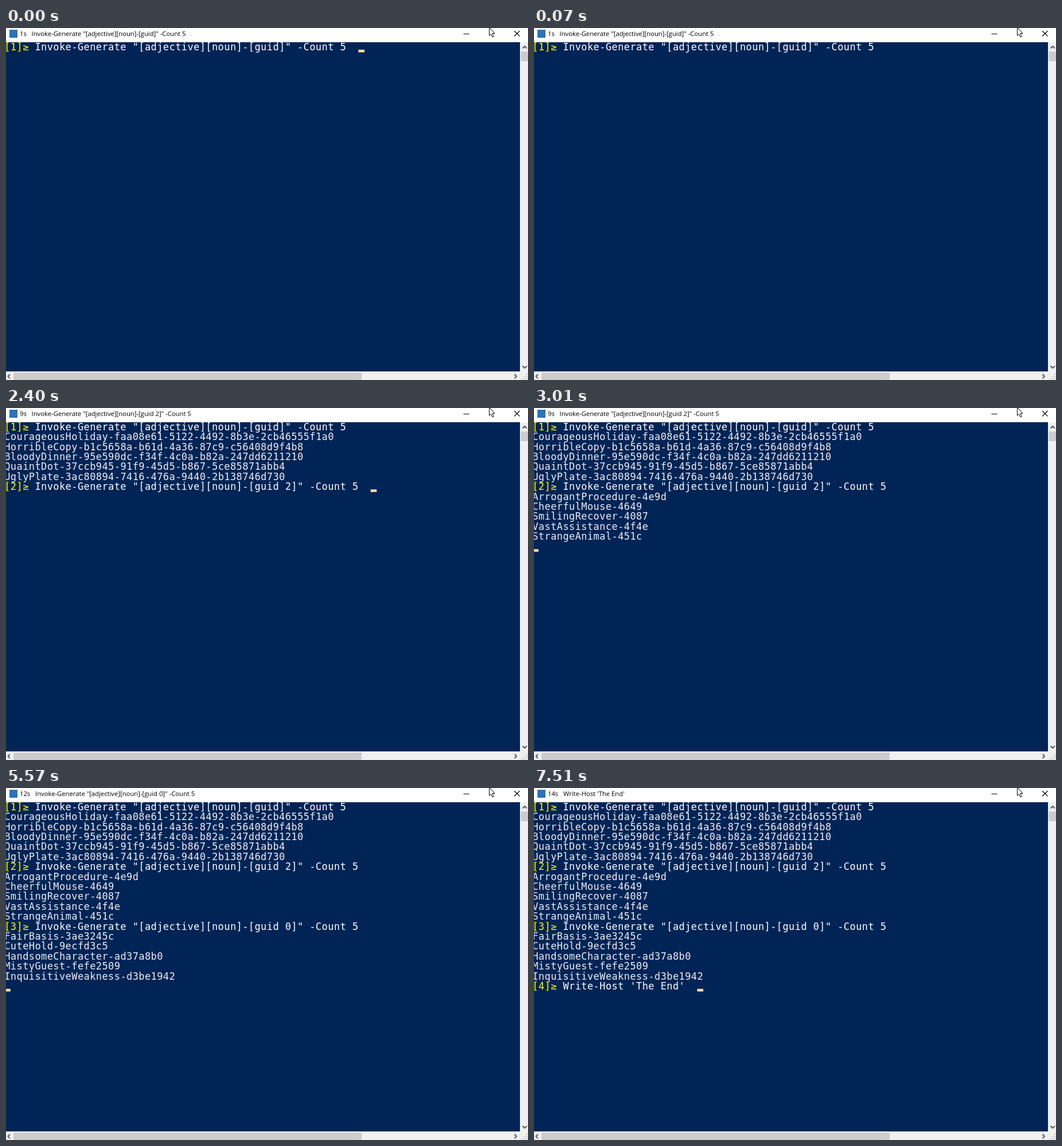
Recreate the animation shown at these times as an HTML page. Size 910x615 px, loop 8.06 s.

```html
<!DOCTYPE html>
<html lang="en">
<head>
<meta charset="utf-8">
<title>Console session</title>
<style>
  html, body { margin: 0; width: 100%; height: 100%; overflow: hidden; background: #fff; }
  svg { display: block; }
  text { white-space: pre; }
  #title { font: 11.25px "Open Sans", sans-serif; }
  #rows { font: 17px "DejaVu Sans Mono", monospace; letter-spacing: .406px; fill: #eeedf0; }
  #rows .prompt { fill: #ff0; }
  #rows .command { fill: #fff; }
  .thumb { fill: #cdcdcd; }
  .arrow { fill: none; stroke: #505050; stroke-width: 1.8; }
</style>
</head>
<body>
<svg width="910" height="615" viewBox="0 0 910 615">
  <rect width="910" height="615" fill="#fff"/>
  <rect x="6" y="3" width="14" height="14" fill="#2b72b9"/>
  <text id="title" x="24" y="14"></text>
  <path d="M797.5 10.5h10M886 5l9.5 9.5M895.5 5l-9.5 9.5" fill="none" stroke="#000" stroke-width="1.1"/>

  <rect y="24.8" width="896" height="575.2" fill="#012456"/>
  <g id="rows"></g>
  <rect id="caret" width="10.64" height="4.6" fill="#fedba9"/>

  <rect x="896" y="25" width="14" height="575" fill="#f0f0f0"/>
  <rect y="600" width="910" height="15" fill="#f0f0f0"/>
  <rect class="thumb" x="897.5" y="41" width="12.5" height="17"/>
  <rect class="thumb" x="13" y="602" width="607" height="13"/>
  <path class="arrow" d="M900.5 35.5l3.7-3.7 3.7 3.7M900.5 590.5l3.7 3.7 3.7-3.7M7 605l-3.6 3.6 3.6 3.6M886.5 605l3.6 3.6-3.6 3.6"/>
  <path d="M907 604h2v2h-2zM907 608h2v2h-2zM903 608h2v2h-2zM907 612h2v2h-2zM903 612h2v2h-2zM899 612h2v2h-2z" fill="#bfbfbf"/>
  <path d="M842.5 -1V13.2L845.6 10.4L848 15.8L850.2 14.9L848 9.5H852Z" fill="#fff" stroke="#000"/>
</svg>
<script>
  const LOOP = 8060;
  const CELL = 10.64, LINE = 17.39, LEFT = -2.8, TOP = 25.6;
  const NS = "http://www.w3.org/2000/svg";
  const $ = id => document.getElementById(id);

  const generate = spec => `Invoke-Generate "[adjective][noun]-[${spec}]" -Count 5`;
  const commands = [generate("guid"), generate("guid 2"), generate("guid 0"), "Write-Host 'The End'"];
  const outputs = [
    ["CourageousHoliday-faa08e61-5122-4492-8b3e-2cb46555f1a0",
     "HorribleCopy-b1c5658a-b61d-4a36-87c9-c56408d9f4b8",
     "BloodyDinner-95e590dc-f34f-4c0a-b82a-247dd6211210",
     "QuaintDot-37ccb945-91f9-45d5-b867-5ce85871abb4",
     "UglyPlate-3ac80894-7416-476a-9440-2b138746d730"],
    ["ArrogantProcedure-4e9d", "CheerfulMouse-4649", "SmilingRecover-4087",
     "VastAssistance-4f4e", "StrangeAnimal-451c"],
    ["FairBasis-3ae3245c", "CuteHold-9ecfd3c5", "HandsomeCharacter-ad37a8b0",
     "MistyGuest-fefe2509", "InquisitiveWeakness-d3be1942"],
    []
  ];

  // Times at which each command and its output appear, and the title's seconds
  const typedAt = [0, 2400, 4810, 7510];
  const printedAt = [370, 3010, 5570, LOOP];
  const seconds = [1, 9, 12, 14];
  const rows = [];

  function addText(str, col, row, from, cls = "") {
    const el = document.createElementNS(NS, "text");
    el.setAttribute("x", LEFT + col * CELL);
    el.setAttribute("y", TOP + row * LINE + 13.3);
    el.setAttribute("class", cls);
    el.textContent = str;
    $("rows").append(el);
    rows.push({ el, from });
  }

  commands.forEach((command, i) => {
    const row = i * 6;
    addText(`[${i + 1}]≥`, 0, row, typedAt[i], "prompt");
    addText(command, 5, row, typedAt[i], "command");
    outputs[i].forEach((line, n) => addText(line, 0, row + 1 + n, printedAt[i]));
  });

  function draw(t) {
    const step = typedAt.filter(from => t >= from).length - 1;
    const printed = t >= printedAt[step];
    for (const { el, from } of rows) el.style.display = t >= from ? "" : "none";
    $("title").textContent = `${seconds[step]}s   ${commands[step]}`;

    const col = printed ? 0 : commands[step].length + 7;
    const row = step * 6 + (printed ? 6 : 0);
    const caret = $("caret");
    caret.setAttribute("x", LEFT + col * CELL);
    caret.setAttribute("y", TOP + (row + 1) * LINE - 5.1);
    caret.style.display = t >= 70 && t < printedAt[0] ? "none" : "";
  }

  const start = performance.now();
  function tick() {
    draw((performance.now() - start) % LOOP);
    requestAnimationFrame(tick);
  }
  tick();
</script>
</body>
</html>
```
